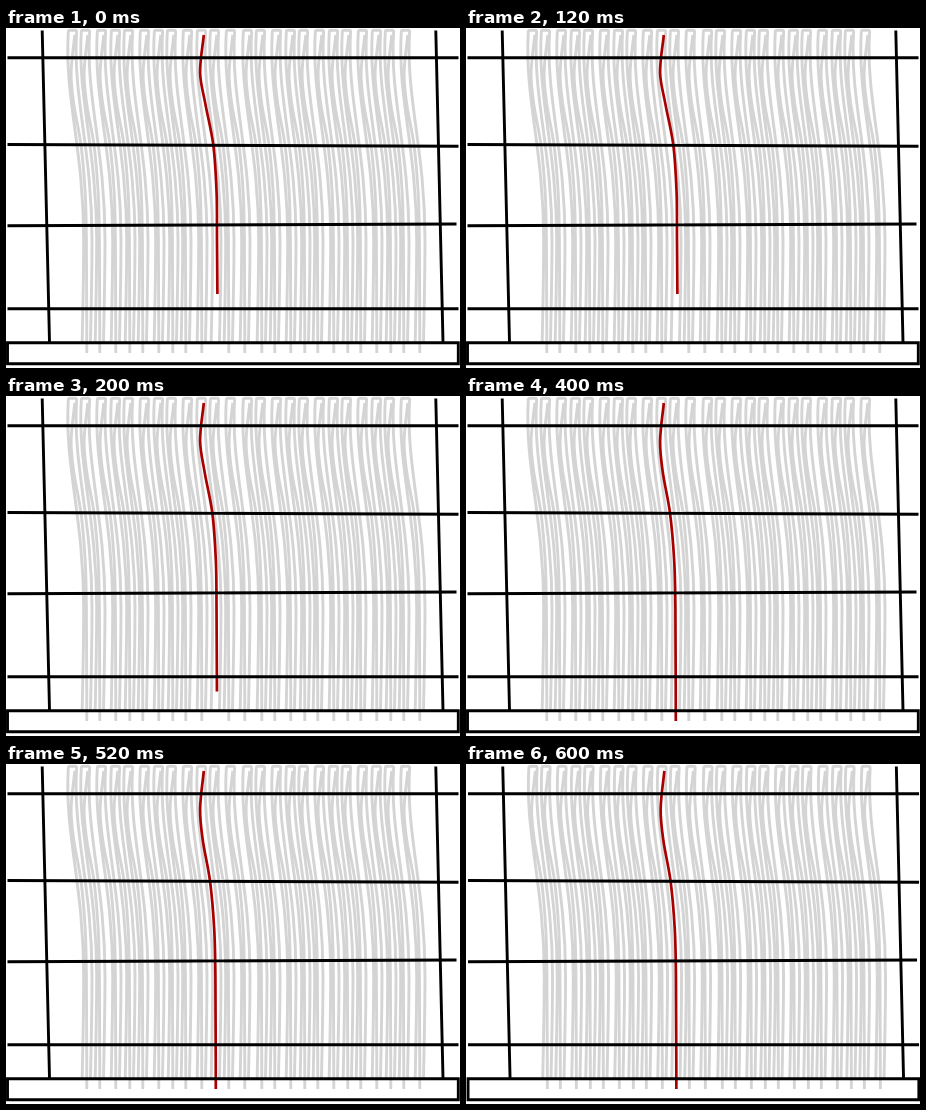
An HTML page that plays this animation: 454 px wide and 340 px high, repeating every 800 ms.

```html
<!DOCTYPE html>
<html lang="en">
<head>
<meta charset="utf-8">
<title>Warp thread</title>
<style>
html, body { margin: 0; width: 100%; height: 100%; overflow: hidden; background: #fff; }
svg { display: block; width: 454px; height: 340px; }
path { fill: none; }
</style>
</head>
<body>
<svg viewBox="0 0 454 340">
  <g id="loom">
    <path id="warp" stroke="#d4d4d4" stroke-width="2.9"/>
    <path id="thread" stroke="#a80000" stroke-width="2.7"/>
    <g stroke="#000" stroke-width="2.9">
      <path d="M36.2 2.5L43.5 314M429.8 2.5L437 314"/>
      <path d="M1.5 29.7H452.5M1.5 116.5L452.5 118.3M1.5 197.7L450.5 196M1.5 280.8H452.5"/>
      <path d="M1.5 314.8H452.3V335.8H1.5Z"/>
    </g>
  </g>
</svg>
<script>
const loom = document.getElementById("loom");
const warp = document.getElementById("warp");
const thread = document.getElementById("thread");

const LOOSE = 9;    // index of the strand being threaded
const FOOT_Y = 325;

// Two banks of four groups, three strands in each group
function strandX(i) {
  const bank = Math.floor(i / 12);
  const group = Math.floor(i / 3) % 4;
  return 62 + 175 * bank + 43 * group + [0, 13, 29][i % 3];
}

// Smooth curve through points that run from top to bottom
function curve(p) {
  const slope = i => {
    const a = p[Math.max(i - 1, 0)], b = p[Math.min(i + 1, p.length - 1)];
    return (b[0] - a[0]) / (b[1] - a[1]);
  };
  let d = `M${p[0]}`;
  for (let i = 1; i < p.length; i++) {
    const [x0, y0] = p[i - 1], [x, y] = p[i];
    const h = (y - y0) / 3;
    d += `C${x0 + h * slope(i - 1)} ${y0 + h} ${x - h * slope(i)} ${y - h} ${x} ${y}`;
  }
  return d;
}

// Outer leg of a loop: an S bend, then nearly straight to the beam
function leg(x) {
  const low = x + 15.4;
  return `M${x} 4C${x - 4} 70 ${low} 120 ${low} 212C${low} 250 ${low - 1} 285 ${low - 1.5} 314`;
}

function loop(x) {
  const cap = `M${x} 4Q${x} 2.2 ${x + 2} 2.2H${x + 6.5}Q${x + 8.4} 2.2 ${x + 8.3} 4`;
  return leg(x) + cap + leg(x + 8.3);
}

// Inner strand; slack pushes its lower part to the right
function strand(x, slack = 0, end = FOOT_Y) {
  return curve([
    [x + 6.8, 7],
    [x + 3.1, 45],
    [x + 5.6 + 2.6 * slack, 75],
    [x + 13 + 3.3 * slack, 117],
    [x + 17.2 + 2.4 * slack, 165],
    [x + 18.4 + 1.6 * slack, 212],
    [x + 18.8 + 1.6 * slack, end]
  ]);
}

let d = "";
for (let i = 0; i < 24; i++) {
  const x = strandX(i);
  d += loop(x + 0.3);
  if (i !== LOOSE) d += strand(x);
}
warp.setAttribute("d", d);

function draw(ms) {
  const step = Math.floor(ms / 200) % 4;
  const down = Math.min(step, 2);
  const slack = [1, 0.7, 0][down];
  thread.setAttribute("d", strand(strandX(LOOSE), slack, 266 + 29.5 * down));
  loom.setAttribute("transform", step === 3 ? "translate(0.55 0)" : "");
}

const start = performance.now();
function tick() {
  draw(performance.now() - start);
  requestAnimationFrame(tick);
}
tick();
</script>
</body>
</html>
```
